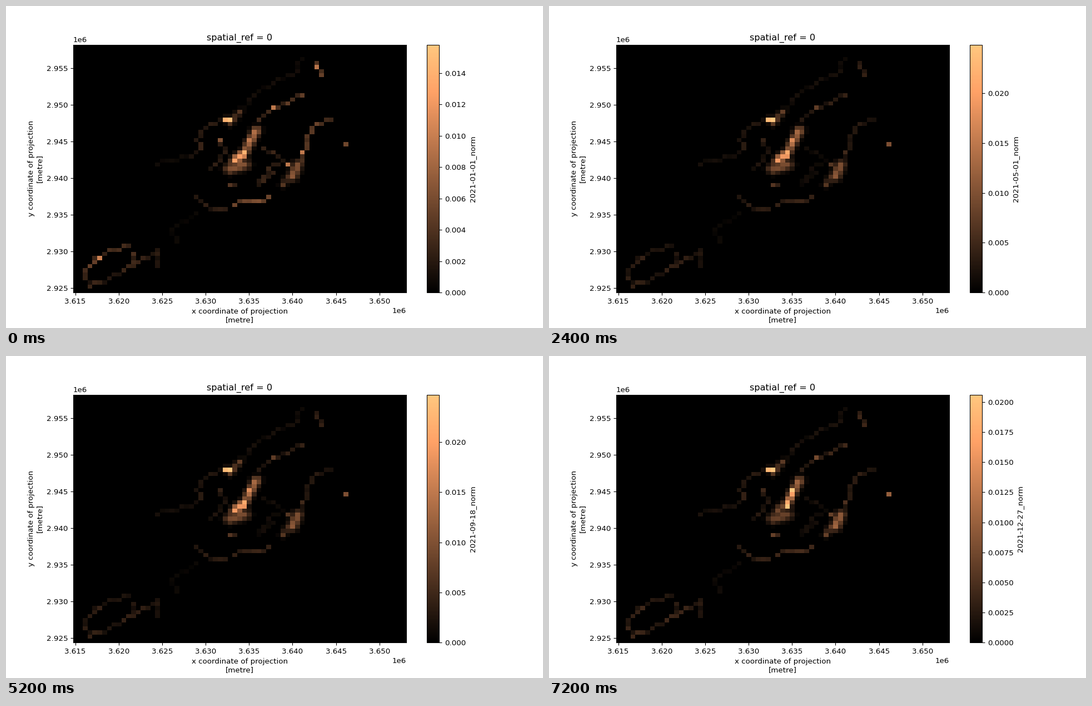
Animation, 966 px wide and 580 px high, one loop 7400 ms. Source, as a matplotlib script:

```python
import numpy as np
import matplotlib.pyplot as plt
from matplotlib.animation import FuncAnimation

FRAMES, STEP_MS = 37, 200
COLS, ROWS, CELL = 69, 61, 555.0
LEFT, BOTTOM = 3.61476e6, 2.92437e6

rng = np.random.default_rng(7)
row, col = np.mgrid[:ROWS, :COLS]
grain = rng.uniform(0.85, 1.08, (ROWS, COLS))
# relative brightness in January, through the year and in late December
states = np.zeros((3, ROWS, COLS))


def blend(shape, levels):
    np.maximum(states, shape * np.reshape(levels, (3, 1, 1)), out=states)


def glow(start, end, width, *levels):
    """Soft light around a segment between two (col, row) points."""
    (c0, r0), (c1, r1) = start, end
    dc, dr = c1 - c0, r1 - r0
    t = ((col - c0) * dc + (row - r0) * dr) / max(dc * dc + dr * dr, 1e-9)
    t = np.clip(t, 0, 1)
    gap2 = (col - c0 - t * dc) ** 2 + (row - r0 - t * dr) ** 2
    shape = np.exp(-gap2 / width ** 2) * grain
    blend(np.where(shape > 0.05, shape, 0), levels)


def shore(first, then, *points):
    """Unevenly lit chain of cells through (col, row) points."""
    shape = np.zeros((ROWS, COLS))
    for (c0, r0), (c1, r1) in zip(points, points[1:]):
        n = max(abs(c1 - c0), abs(r1 - r0)) + 1
        cs = np.rint(np.linspace(c0, c1, n)).astype(int)
        rs = np.rint(np.linspace(r0, r1, n)).astype(int)
        shape[rs, cs] = rng.uniform(0.5, 1.15, n)
    blend(shape, (first, then, then * 1.2))


def spot(c, r, first, then):
    glow((c, r), (c, r), 0.5, first, then, then * 1.2)


# main island
shore(0.16, 0.12, (30, 18), (27, 20), (25, 23), (26, 25), (24, 27))
shore(0.06, 0.07, (35, 15), (37, 12), (42, 8), (45, 7), (47, 3))
shore(0.27, 0.15, (38, 18), (40, 16), (43, 14), (47, 12))
shore(0.30, 0.15, (50, 4), (51, 7))
shore(0.32, 0.13, (53, 18), (50, 19), (48, 22), (47, 28))
shore(0.17, 0.06, (39, 25), (43, 28), (40, 30), (38, 34), (41, 31))
shore(0.15, 0.10, (30, 23), (31, 26), (28, 30))
shore(0.42, 0.20, (33, 39), (35, 38), (38, 38), (40, 37))
shore(0.15, 0.14, (31, 40), (28, 40), (25, 37))
shore(0.25, 0.25, (32, 34), (33, 34))

# faint links and the small south-western island
shore(0.05, 0.07, (17, 29), (19, 28), (23, 27))
shore(0.04, 0.04, (25, 41), (20, 45), (21, 48))
shore(0.30, 0.13, (2, 56), (4, 52), (8, 50), (11, 49))
shore(0.17, 0.15, (2, 56), (3, 59), (7, 57), (13, 53), (17, 50))
shore(0.14, 0.11, (17, 50), (17, 54))
shore(0.22, 0.11, (12, 51), (12, 53))

# central ridge: its core drifts north-east at the end of the year
glow((33, 28), (35, 26), 0.9, 0.92, 0.88, 0.4)
glow((37.5, 20.5), (35.4, 25), 0.95, 0.55, 0.52, 0.5)
glow((32, 30), (35, 29), 1.2, 0.46, 0.42, 0.36)
glow((36, 23), (35, 27), 0.65, 0.6, 0.7, 1)

# brightest shore and the eastern cluster
glow((31, 18), (32, 18), 0.6, 0.95, 1, 0.98)
glow((32, 19), (34, 16), 0.7, 0.26, 0.3, 0.28)
glow((46, 29), (45, 32), 1.05, 0.42, 0.42, 0.48)
glow((44, 32), (43, 34), 0.7, 0.25, 0.25, 0.3)

spot(30, 23, 0.42, 0.17)
spot(41, 15, 0.65, 0.33)
spot(50, 5, 0.66, 0.18)
spot(47, 26, 0.6, 0.2)
spot(44, 29, 0.66, 0.3)
spot(56, 24, 0.34, 0.38)
spot(5, 52, 0.75, 0.2)

states = np.clip(states, 0, 1)


def grid(i):
    start = max(0, 1 - i / 6) ** 2
    end = max(0, (i - 30) / 6)
    return np.tensordot((start, 1 - start - end, end), states, 1)


def peak(i):
    """Top of the colour scale: a quick rise, a plateau, a late fall."""
    return np.interp(i, (0, 6, 12, 18, 22, 30, 36),
                     (0.01582, 0.02359, 0.02489, 0.02459,
                      0.02416, 0.0253, 0.02062))


# text and its spacing are slightly smaller than the defaults
for key in ("font.size", "axes.titlepad", "axes.labelpad", "axes.linewidth",
            "xtick.major.pad", "ytick.major.pad",
            "xtick.major.size", "ytick.major.size"):
    plt.rcParams[key] *= 0.966

fig, ax = plt.subplots(figsize=(9.66, 5.80), dpi=100)
xs = LEFT + CELL * np.arange(COLS + 1)
ys = BOTTOM + CELL * np.arange(ROWS, -1, -1)
mesh = ax.pcolormesh(xs, ys, grid(0) * peak(0), cmap="copper",
                     vmin=0, vmax=peak(0))
ax.set_xlim(xs[0], xs[-1])
ax.set_ylim(ys[-1], ys[0])
ax.set_title("spatial_ref = 0")
ax.set_xlabel("x coordinate of projection\n[metre]")
ax.set_ylabel("y coordinate of projection\n[metre]")
bar = fig.colorbar(mesh, ax=ax)


def draw(i):
    day = np.datetime64("2021-01-01") + np.timedelta64(10 * i, "D")
    mesh.set_array(grid(i) * peak(i))
    mesh.set_clim(0, peak(i))
    bar.set_label(f"{day}_norm")
    return (mesh,)


anim = FuncAnimation(fig, draw, frames=FRAMES, interval=STEP_MS,
                     init_func=lambda: draw(0), repeat=True, repeat_delay=0)
plt.show()
```
